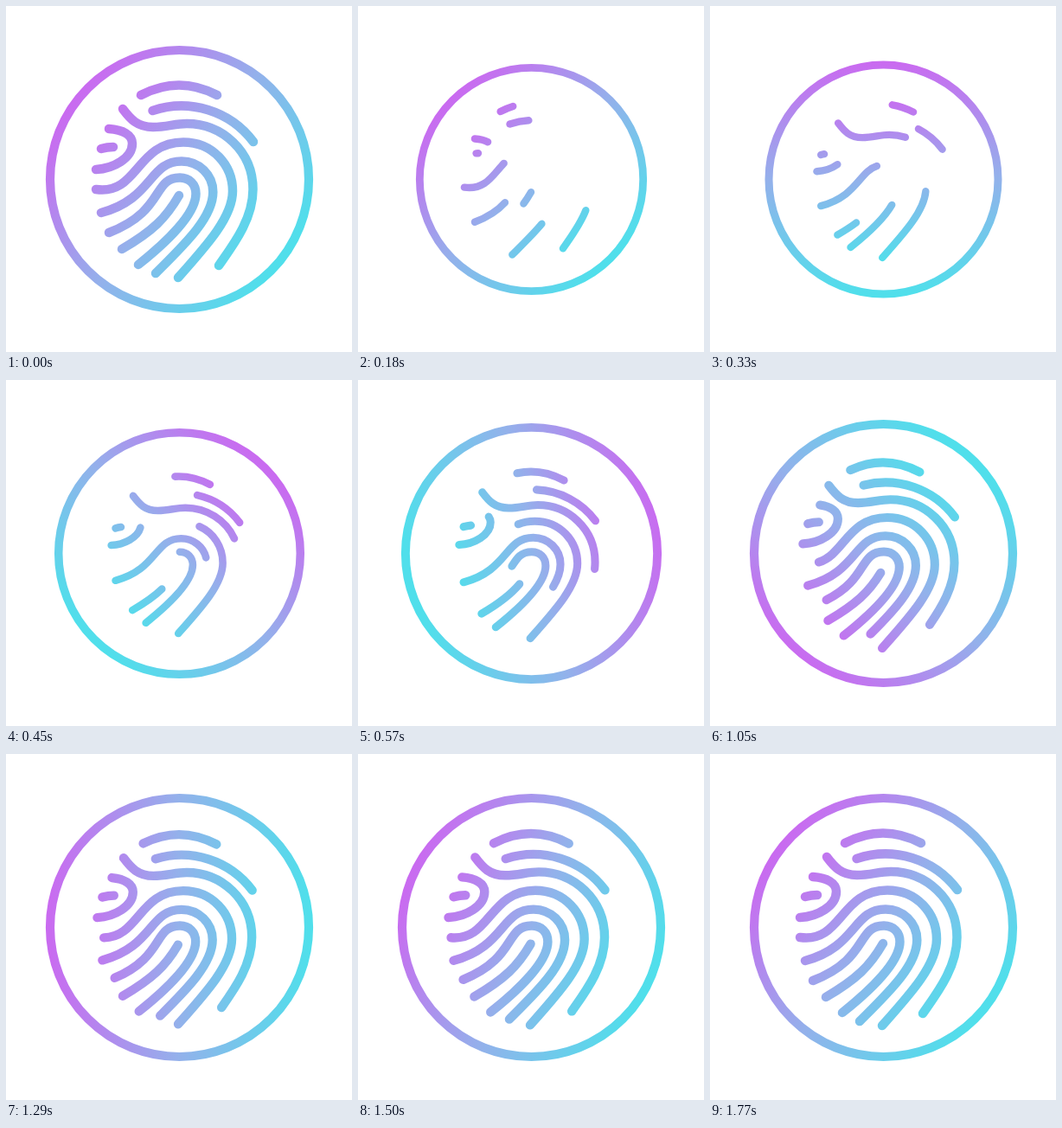
An HTML page with a canvas that plays this animation: 400x400 px, repeating every 3.8 s.

```html
<!DOCTYPE html>
<html lang="en">
<head>
<meta charset="utf-8">
<title>Fingerprint</title>
<style>
html, body { margin: 0; width: 100%; height: 100%; overflow: hidden; background: #fff; }
canvas { display: block; width: 400px; height: 400px; }
</style>
</head>
<body>
<canvas id="stage" width="400" height="400"></canvas>
<script>
const ctx = document.getElementById('stage').getContext('2d');
const LOOP = 3800, STEP = 30, END = 1770;
const COLORS = ['#c96bf0', '#93b1eb', '#50dfeb'];

// Each ridge runs from the end that vanishes last to the end that returns first.
const ridges = [
  'M156 103Q200 80 244 103',
  'M169.5 121A104 104 0 0 1 286 157',
  'M246 300C262 277 285.5 247 285.5 212C285.5 168 250 136 209 136C195 136 186 140 170 140C152 140 144 131 135 119',
  'M104 212C153 219 150 157.5 205 157.5C239 157.5 262 184 262 214C262 244 232 277 199 314',
  'M173 309C205 277 239.3 245 239.3 215C239.3 195 223 179.5 203 179.5C165 179.5 170 223 110 239',
  'M119 262C184 237 169 198.5 201 198.5C212 198.5 219.5 206 219.5 217C219.5 240 187 272 153 299',
  'M200 219C185 245 170 260 134 281',
  'M119 142C135 143 146 149 146 159C146 176 124 188 104 189',
  'M124 163Q117 163 110 165'
].map(d => {
  const el = document.createElementNS('http://www.w3.org/2000/svg', 'path');
  el.setAttribute('d', d);
  return { path: new Path2D(d), len: el.getTotalLength() };
});

// Smooth monotone curve through [time, value] keys, at rest at both ends.
function track(keys) {
  const rate = i => (keys[i + 1][1] - keys[i][1]) / (keys[i + 1][0] - keys[i][0]);
  const slopes = keys.map((k, i) => {
    if (i === 0 || i === keys.length - 1) return 0;
    const a = rate(i - 1), b = rate(i);
    return a * b <= 0 ? 0 : 2 * a * b / (a + b);
  });
  return t => {
    const last = keys.length - 1;
    if (t >= keys[last][0]) return keys[last][1];
    let i = 0;
    while (t >= keys[i + 1][0]) i++;
    const [t0, v0] = keys[i], [t1, v1] = keys[i + 1];
    const h = t1 - t0, u = (t - t0) / h, w = 1 - u;
    return v0 * (1 + 2 * u) * w * w + v1 * u * u * (3 - 2 * u)
      + h * u * w * (slopes[i] * w - slopes[i + 1] * u);
  };
}

const ringScale = track([[0, 1], [180, .864], [210, .857], [450, .935], [570, .974], [810, .998], [1100, 1]]);
const printScale = track([[0, 1], [180, .803], [270, .795], [450, .816], [570, .866], [810, .932], [1290, .985], [END, 1]]);
const angle = track([[0, 37], [180, 45], [450, 135], [570, 166], [810, 243], [1290, 360], [END, 397]]);
const shift = track([[0, 0], [450, 0], [570, 8], [810, 8], [1290, 0]]);

// Visible span of every ridge, as fractions of its length.
function span(t) {
  const turn = 195;
  if (t < turn) return [0, 1 - (t / turn) ** 3];
  const left = x => Math.exp((turn - x) / 312);
  const shown = t >= END ? 1 : (1 - left(t)) / (1 - left(END));
  return [1 - shown, 1];
}

function blend(t, radius) {
  const a = angle(t) * Math.PI / 180, dx = Math.cos(a), dy = Math.sin(a);
  const at = r => [200 + dx * r, 200 + dy * r];
  const off = shift(t);
  const g = ctx.createLinearGradient(...at(-radius - off), ...at(radius - off));
  COLORS.forEach((c, i) => g.addColorStop(i / 2, c));
  return g;
}

function scaled(s, x, y, paint) {
  ctx.save();
  ctx.translate(x, y);
  ctx.scale(s, s);
  ctx.translate(-x, -y);
  paint();
  ctx.restore();
}

function draw(t) {
  ctx.fillStyle = '#fff';
  ctx.fillRect(0, 0, 400, 400);
  ctx.lineCap = 'round';

  scaled(ringScale(t), 200.5, 200.5, () => {
    ctx.lineWidth = 10.2;
    ctx.strokeStyle = blend(t, 150);
    ctx.beginPath();
    ctx.arc(200.5, 200.5, 149.5, 0, 2 * Math.PI);
    ctx.stroke();
  });

  const [from, to] = span(t);
  scaled(printScale(t), 200, 200, () => {
    ctx.lineWidth = 10.5;
    ctx.strokeStyle = blend(t, 122);
    for (const { path, len } of ridges) {
      if (to - from < 1) {
        ctx.setLineDash([(to - from) * len, len * 2]);
        ctx.lineDashOffset = -from * len;
      }
      ctx.stroke(path);
    }
  });
}

function tick() {
  const t = performance.now() % LOOP;
  draw(Math.floor(t / STEP) * STEP);
  requestAnimationFrame(tick);
}
tick();
</script>
</body>
</html>
```
